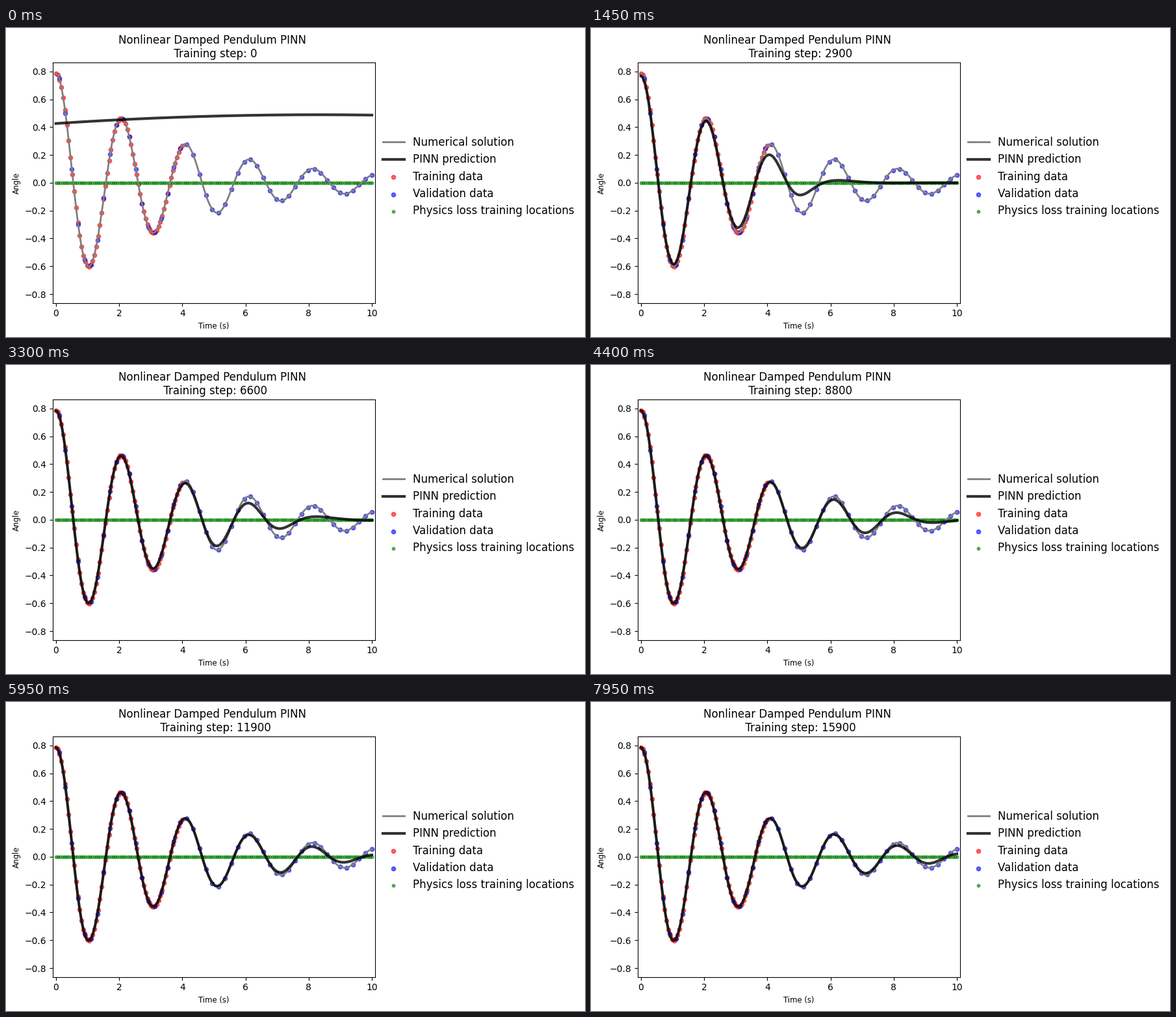
A matplotlib script for the animation above (8 s loop, 891x475 px).

```python
import numpy as np
import matplotlib.pyplot as plt
from matplotlib.animation import FuncAnimation

W, H, DPI = 891, 475, 100
FRAMES, INTERVAL = 160, 50

plt.rcParams["font.family"] = "DejaVu Sans"


def pendulum(t_end=10.5, dt=0.005, g=9.81, drag=0.5):
    """Integrate the damped pendulum with RK4; return times and angles."""
    def rate(y):
        return np.array([y[1], -g * np.sin(y[0]) - drag * y[1]])

    t = np.arange(0, t_end + dt, dt)
    y = np.empty((len(t), 2))
    y[0] = np.pi / 4, 0
    for i in range(len(t) - 1):
        k1 = rate(y[i])
        k2 = rate(y[i] + dt / 2 * k1)
        k3 = rate(y[i] + dt / 2 * k2)
        k4 = rate(y[i] + dt * k3)
        y[i + 1] = y[i] + dt / 6 * (k1 + 2 * k2 + 2 * k3 + k4)
    return t, y[:, 0]


sim_t, sim_a = pendulum()


def angle(t):
    return np.interp(t, sim_t, sim_a)


def predict(t, frame):
    """The learned part is the true swing, faded and slowed past a moving front."""
    front = np.interp(frame, [0, 17, 29, 66, 105, 159], [0, 3.1, 4.84, 7.05, 9.0, 9.6])
    width = min(0.5 + 0.008 * frame, 1.1)
    gain = 1 - 0.25 * np.exp(-frame / 12)
    fade = gain / (1 + np.exp((t - front) / width))
    lag = 0.46 * 0.3 * np.log1p(np.exp((t - front - 0.75) / 0.3))
    learned = fade * angle(t - lag)
    untrained = 0.489 - 0.063 * (1 - t / 8.3) ** 2
    w = np.exp(-frame / 1.5)
    return w * untrained + (1 - w) * learned


fig = plt.figure(figsize=(W / DPI, H / DPI), dpi=DPI, facecolor="white")


def axes_box(left, bottom):
    return [left / W, bottom / H, 496 / W, 369.6 / H]


ax = fig.add_axes(axes_box(80, 52.8))

t = np.linspace(0, 10, 500)
t_train = np.linspace(0, 4, 70)
t_val = np.linspace(0.1, 10, 50)
t_phys = np.linspace(0, 10, 150)

ax.plot(t, angle(t), color="gray", lw=2, label="Numerical solution")
pred, = ax.plot(t, predict(t, 0), color="black", lw=3, alpha=0.8, label="PINN prediction")
ax.scatter(t_train, angle(t_train), s=20, color="red", alpha=0.6, label="Training data")
ax.scatter(t_val, angle(t_val), s=20, color="blue", alpha=0.6, label="Validation data")
ax.scatter(t_phys, 0 * t_phys, s=10, color="green", alpha=0.6,
           label="Physics loss training locations")

ax.set_xlim(-0.1, 10.1)
ax.set_ylim(-1.1 * np.pi / 4, 1.1 * np.pi / 4)
ax.set_xlabel("Time (s)", fontsize="small")
ax.set_ylabel("Angle", fontsize="small")
ax.legend(loc=(1.01, 0.34), frameon=False, fontsize="large")
title = ax.set_title("")

# Move the axes so that the labels keep a margin of 0.1 inch.
fig.canvas.draw()
margin = fig.get_tightbbox(fig.canvas.get_renderer()).padded(0.1)
ax.set_position(axes_box(80 - margin.x0 * DPI, 52.8 - margin.y0 * DPI))


def draw(frame):
    pred.set_ydata(predict(t, frame))
    title.set_text(f"Nonlinear Damped Pendulum PINN \n Training step: {frame * 100}")
    return pred, title


anim = FuncAnimation(fig, draw, frames=FRAMES, interval=INTERVAL,
                     init_func=lambda: draw(0), repeat=True, repeat_delay=0)
plt.show()
```
